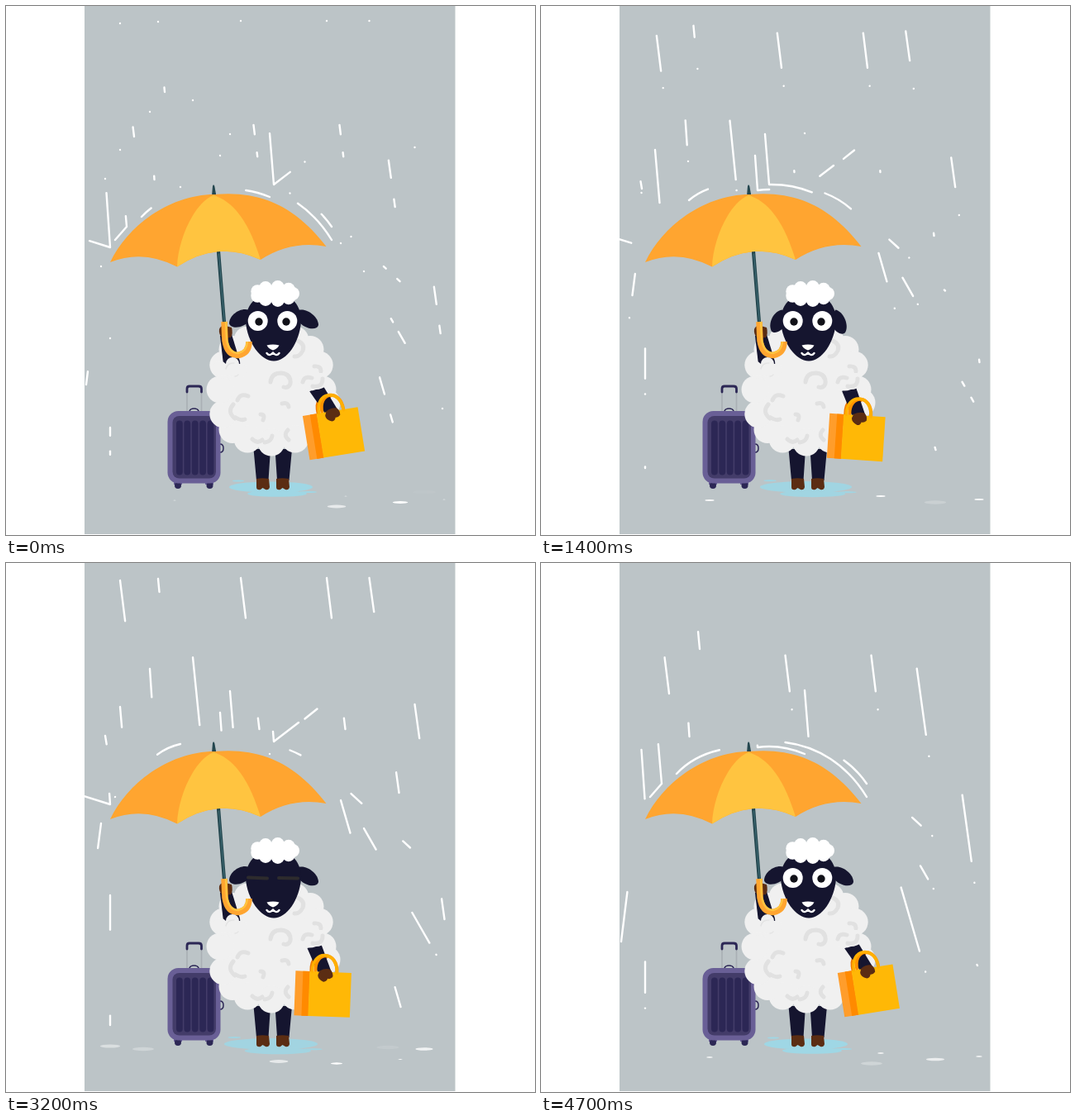
Write an HTML page that moves like this. It is 640 px wide and 640 px high and loops after 4.8 s.

```html
<!DOCTYPE html>
<html lang="en">
<head>
<meta charset="utf-8">
<title>Sheep in the rain</title>
<style>
  html, body { margin: 0; width: 100%; height: 100%; overflow: hidden; background: #fff; }
  svg { display: block; width: 100vw; height: 100vh; }
  .line { fill: none; stroke-linecap: round; stroke-linejoin: round; }
  .flat { stroke-linecap: butt; }
  .navy { fill: #15152f; }
  .brown { fill: #5b2d13; }
</style>
</head>
<body>
<svg viewBox="0 0 640 640">
  <defs><clipPath id="card"><rect x="95" width="448.700" height="639"/></clipPath></defs>
  <g clip-path="url(#card)">
    <rect x="95" width="448.700" height="639" fill="#bcc4c7"/>
    <g id="ripples" fill="#fff"></g>
    <g id="rain" class="line" stroke="#fff" stroke-width="2.4"></g>

    <g id="puddle" fill="#9fd7e5">
      <ellipse cx="320.5" cy="582" rx="50.5" ry="6.6"/>
      <ellipse cx="328" cy="590" rx="36" ry="3.8"/>
      <ellipse cx="281" cy="574.5" rx="7" ry="1"/>
      <ellipse cx="366" cy="588" rx="10" ry="1"/>
    </g>

    <g id="suitcase">
      <path class="line" d="M219 467V490M236.5 467V490" stroke="#a9afb4" stroke-width="1.6"/>
      <path class="line" d="M219 467V463Q219 460 222 460H233Q236.5 460 236.5 463V467" stroke="#2c2755" stroke-width="2.8"/>
      <path class="line" d="M222 490Q223 487 227.5 487T233 490M259 530Q263 530 263 535T259 540" stroke="#2c2755" stroke-width="1.5"/>
      <path d="M203 575h10v4h-10zM241 575h10v4h-10z" fill="#695f96"/>
      <g fill="#2c2755"><circle cx="208" cy="580" r="4"/><circle cx="246.5" cy="580" r="4"/></g>
      <rect x="195.500" y="490" width="64" height="87.5" rx="13" fill="#695f96"/>
      <rect x="201.500" y="496" width="52.500" height="75.500" rx="8" fill="#433c69"/>
      <g id="ribs" fill="#2c2755"></g>
    </g>

    <path class="navy" d="M299.5 536H320L317.5 574H303ZM325.5 536H346L342.5 574H328Z"/>
    <path id="hoof" class="brown" d="M303 572Q310 570.5 318 572L319 582Q318 586 314 585L310.5 583L308 585Q303 586 303 582Z"/>
    <use href="#hoof" x="24"/>

    <g id="fleece" fill="#f0f0f0"></g>
    <g class="line" stroke="#e1e1e1" stroke-width="5">
      <path d="M353 405q9 4 6 12q-4 8-10 7M320 455q1-11 13-11q12 1 11 13q-2 6-8 4M373 436q8-1 8 6"/>
      <path d="M293 472q-10-4-13 5M275 482q-8 9 2 17M278 498q6 4 11 2M334 481q7-2 8 4M308 494q6 0 3 7M341 513q-6 6 1 12M298 524q6 6 12 1M313 528q8-1 9-8"/>
    </g>

    <g id="bag">
      <path class="line" d="M371 494C370 477 377 474 388 476" stroke="#f07c00" stroke-width="4"/>
      <path class="navy" d="M365 466L381 459L395 493L381 499Z"/>
      <path class="line" d="M376 494C374 468 402 468 402 494" stroke="#ff9400" stroke-width="4"/>
      <rect x="352" y="494" width="17" height="54" fill="#ff9d2b"/>
      <rect x="361" y="494" width="8.5" height="54" fill="#ff8a00"/>
      <rect x="369" y="494" width="50.5" height="54" fill="#ffb806"/>
      <path class="line" d="M372 494C371 467 402 467 402 495" stroke="#ffb000" stroke-width="3.5"/>
      <path class="brown" d="M381 493Q388 489 394 491Q398 495 397 500Q394 503 391 502Q390 506 386 506Q379 503 379 498Z"/>
    </g>
    <path d="M356 462a12 12 0 0 1 8-18h18a12 12 0 0 1 8 14q-8 6-15 6q-10 4-19-2Z" fill="#f0f0f0"/>
    <path class="line" d="M359 455q2-8 11-5M371 460q12 2 12-9" stroke="#e1e1e1" stroke-width="5"/>

    <path id="earL" class="navy" d="M294 368C284 364 270 374 270 384C272 392 289 389 294 381Z"/>
    <path id="earR" class="navy" d="M354 368C364 365 378 376 378 386C376 394 359 390 354 381Z"/>
    <path class="navy" d="M324 347C346 347 358 364 357 382C355 407 340 429.5 324 429.5C308 429.5 292 407 290 382C289 364 302 347 324 347Z"/>
    <g id="hair" fill="#fff"></g>
    <g id="open">
      <g fill="#fff"><circle cx="304.7" cy="381" r="12"/><circle cx="340.3" cy="381" r="12"/></g>
      <g fill="#111118"><circle cx="306" cy="382" r="4.7"/><circle cx="339" cy="382" r="4.7"/></g>
    </g>
    <path id="closed" class="line" d="M293 380.5L316 381.5M330 381L353 381.5" stroke="#2d2b2d" stroke-width="4"/>
    <path d="M315.5 410.5Q323 408.5 330.5 410.5Q328 415 323 416.5Q318 415 315.5 410.5Z" fill="#fff"/>
    <path class="line" d="M315.5 420Q319 424.5 323 419.5Q327 424.5 330.5 420" stroke="#fff" stroke-width="2.4"/>

    <g id="umbrella">
      <path class="navy" d="M259 399L272 394L283 430L284 442H264Z"/>
      <path class="brown" d="M258 391Q260 386 266 387L273 389Q275 396 272 401L262 402Q257 397 258 391Z"/>
      <path d="M249 230L250 218Q251 214.5 252.3 218L254.5 230Z" fill="#24474f"/>
      <path class="line" d="M257 297L264 383" stroke="#24474f" stroke-width="4.2"/>
      <path class="line" d="M257.5 300L264.2 381" stroke="#43707a"/>
      <path class="line flat" d="M264 382L265 405Q268 423 281 422.5Q294 420 294 406" stroke="#ffa530" stroke-width="7.5"/>
      <path class="line flat" d="M266 382L267 404Q270 420 281 420Q291 418 292 406" stroke="#ffc440" stroke-width="2.5"/>
      <path d="M126 310C149 262 202 228 252 228C318 222 356 251 387.5 291Q345 283 308 307Q255 283 207 315.5Q166 294 126 310Z" fill="#ffa530"/>
      <path d="M207 315.5C208 282 228 238 251 229C281 238 297 272 308 307Q255 283 207 315.5Z" fill="#ffc440"/>
    </g>
    <path d="M264 446a9 9 0 1 1 2-13a8 8 0 0 1 16 0a8 8 0 1 1 4 16h-8Z" fill="#f0f0f0"/>
    <path class="line" d="M266 439Q268 431 276 432M277 448q3 0 4-2" stroke="#e4e4e4" stroke-width="1.5"/>
  </g>
</svg>
<script>
const LOOP = 4800, STEP = 100, FRAME = 40, RAIN_CYCLE = 24, RAIN_GAP = 10;
const $ = id => document.getElementById(id);
const clamp = u => Math.max(0, Math.min(1, u));
const smooth = u => { u = clamp(u); return u * u * u * (u * (6 * u - 15) + 10); };
const wave = u => (1 - Math.cos(2 * Math.PI * u)) / 2;
const mod = (a, b) => ((a % b) + b) % b;
const show = (el, on) => el.setAttribute("visibility", on ? "visible" : "hidden");

function add(parent, tag, attrs) {
  const el = document.createElementNS("http://www.w3.org/2000/svg", tag);
  for (const k in attrs) el.setAttribute(k, attrs[k]);
  return parent.appendChild(el);
}

// A woolly shape: a core ringed with round tufts; power below 1 squares it off.
function wool(id, cx, cy, rx, ry, tuft, count, power) {
  const bend = v => Math.sign(v) * Math.abs(v) ** power;
  add($(id), "ellipse", { cx, cy, rx, ry });
  for (let i = 0; i < count; i++) {
    const a = 2 * Math.PI * i / count;
    add($(id), "circle", { cx: cx + rx * bend(Math.cos(a)), cy: cy + ry * bend(Math.sin(a)), r: tuft });
  }
}
wool("fleece", 321, 464, 62, 64, 16.5, 16, .8);
add($("fleece"), "circle", { cx: 387, cy: 480, r: 17.5 });
wool("hair", 325, 348, 22, 8, 8, 9, 1);

for (let i = 0; i < 5; i++)
  add($("ribs"), "rect", { x: 206 + 9.4 * i, y: 501.5, width: 7.8, height: 66, rx: 3.9 });

// Rain: each stream is one path; its streaks run one after another between pairs of marks.
const fast = { head: [0.5, 10.5], tail: [7.5, 9.6], life: 19 };
const slow = { head: [2.8, 15.4], tail: [13, 18], life: 33 };
const whole = [0, 1];
const even = [0, .31, .43, .75, .87, 1];
const tall = [0, .185, .315, .73, .83, 1];
const sparse = [0, .21, .39, .59, .78, 1];
const streaks = [];

function stream(d, marks, pace = fast, delay = 0) {
  for (let i = 0; i < marks.length / 2; i++)
    for (let extra = 0; extra < pace.life; extra += RAIN_CYCLE) {
      const el = add($("rain"), "path", { d }), total = el.getTotalLength();
      const from = total * marks[2 * i], length = total * marks[2 * i + 1] - from;
      streaks.push({ el, pace, extra, total, from, length, start: delay + i * RAIN_GAP });
    }
}

for (const x of [284, 388]) stream(`M${x} 18l22.5 183`, even);
stream("M126 402V559", even);
for (const from of ["439.5 18", "494.5 171"]) stream(`M${from}l36 260`, tall);
stream("M405 287L477.5 537", tall);
stream("M417.5 279L489 344.5", sparse);
stream("M433 321L528 487", [0, .18, .24, .37, .44, .835, .92, 1]);
stream("M138 21L155 158", [0, .42, .57, 1]);
stream("M184 19L192 104", [0, .22, .67, 1]);
stream("M174 128L179.5 210", [0, .49, .73, 1]);
stream("M115 315L107 377L97 458", [0, .245, .435, 1]);
stream("M226 114L237 223Q190 227 164 255", [0, .505, .575, 1]);

// Streaks that hit the umbrella and run or bounce off it.
for (const d of ["M120 209L122 221", "M361.5 188.5L379 174.5", "M211 219Q193 223 179 235"]) stream(d, whole);
for (const d of ["M138 174L146 267L132 283", "M271 155L276 216C322 215 366 237 394 283",
  "M343.5 226.5Q374 238 394 267", "M259 181L262 223Q290 219 319 231"]) stream(d, whole, slow);
for (const d of ["M121.5 226L126 292L88 280", "M319 154L324 216L354 193"]) stream(d, whole, slow, RAIN_GAP);

function drawRain(n) {
  for (const { el, pace, extra, total, from, length, start } of streaks) {
    const age = mod(n - start, RAIN_CYCLE) + extra;
    const along = ([begin, span]) => smooth((age - begin) / span) * length;
    const tail = Math.min(along(pace.tail), length - 0.05);
    const dash = Math.max(0.02, along(pace.head) - tail);
    show(el, age < pace.life);
    el.setAttribute("stroke-dasharray", `${dash} ${total * 2}`);
    el.setAttribute("stroke-dashoffset", -(from + tail));
  }
}

// Ground ripples: drops land in turn, then widen and fade for half a cycle.
const ripples = [];
function splash(points, size, first, gap) {
  points.forEach(([cx, cy], i) =>
    ripples.push({ el: add($("ripples"), "ellipse", { cx, cy }), size, birth: first + i * gap }));
}
splash([[130, 608], [267.5, 599.5], [462, 586], [166, 588], [126, 584.5], [330, 603], [506, 588]], 14, .7, .045);
splash([[400, 605.5], [477, 600.5]], 14, .13, .11);
splash([[204, 598], [411, 593], [530, 597]], 8, .44, 0);

function drawRipples(n) {
  const phase = .46 + n * .035;
  for (const { el, birth, size } of ripples) {
    const u = clamp(mod(phase - birth, 1) * 2), rx = size * Math.sqrt(u);
    el.setAttribute("rx", rx);
    el.setAttribute("ry", rx * .165);
    el.setAttribute("opacity", Math.min(1, (1 - u) * 1.9));
  }
}

function draw(time) {
  const t = Math.floor((time % LOOP) / STEP) * STEP;
  const n = Math.floor(t / FRAME), beat = n % 60;
  drawRain(n);
  drawRipples(n);

  const spread = wave(n / 120);
  $("puddle").setAttribute("transform",
    `translate(320.5 584) scale(${1 + .16 * spread} ${1 + .06 * spread}) translate(-320.5 -584)`);
  $("puddle").setAttribute("opacity", 1 - .15 * spread);

  $("bag").setAttribute("transform", `rotate(${14.3 * wave((n + 1) / 60) - 9.2} 368 452)`);

  const droop = 30 * (smooth((beat - 20) / 5) - smooth((beat - 40) / 7));
  $("earL").setAttribute("transform", `rotate(${-droop} 292 372)`);
  $("earR").setAttribute("transform", `rotate(${droop} 356 372)`);

  const blink = beat >= 18 && beat < 28;
  show($("open"), !blink);
  show($("closed"), blink);
}

const began = performance.now();
function tick() {
  draw(performance.now() - began);
  requestAnimationFrame(tick);
}
tick();
</script>
</body>
</html>
```
